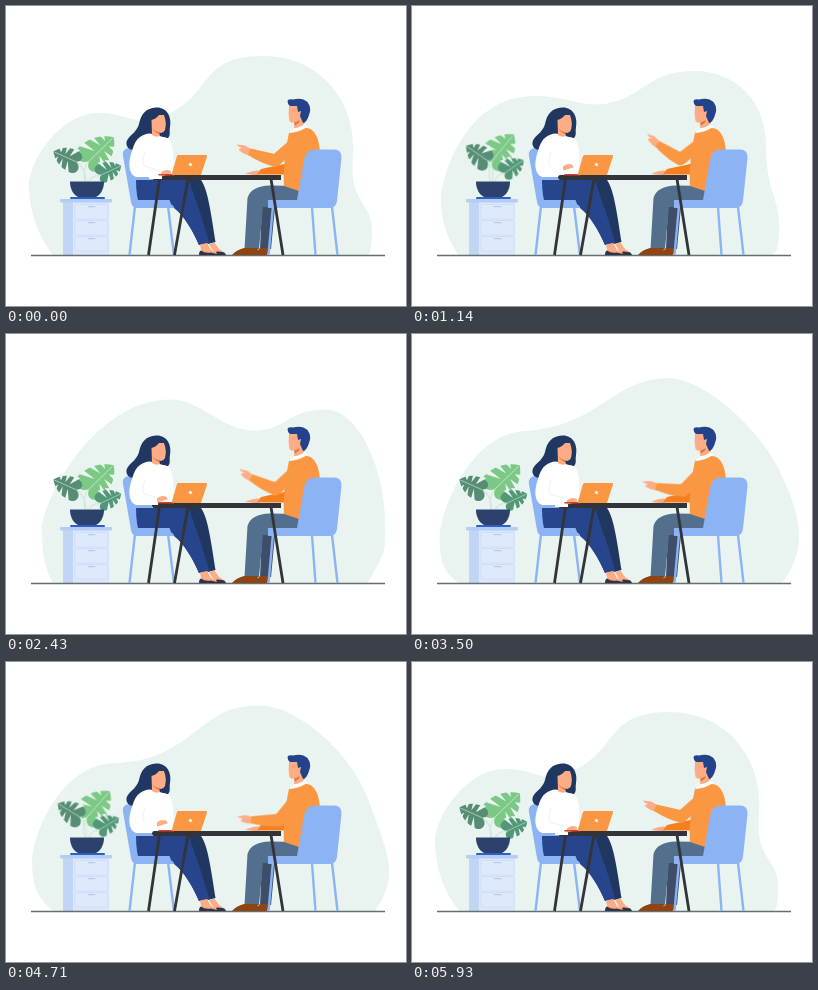
An HTML page without scripts that plays this animation: 400 px wide and 300 px high, repeating every 6070 ms.

```html
<!DOCTYPE html>
<html lang="en">
<head>
<meta charset="utf-8">
<title>Meeting at a table</title>
<style>
  html, body { margin: 0; width: 100%; height: 100%; overflow: hidden; background: #fff; }
  body > svg { display: block; width: 100%; height: 100%; }

  .blob, .leaf, .upper-arm, .forearm, .typing {
    animation: 6070ms ease-in-out infinite;
  }
  .blob { animation-name: morph; fill: #e9f4f0; }
  .leaf { animation-name: sway; transform-origin: 81px 178px; }
  .upper-arm { animation-name: swing; transform-origin: 293px 134px; }
  .forearm { animation-name: gesture; transform-origin: 270px 155px; }
  .typing { animation-name: type; }

  @keyframes morph {
    0%, 4.78%, 97.69%, 100% {
      d: path("M48 250C33 232 23 206 23 180S55 107 92 107C129 107 130 126 168 105S196 50 257 50S351 100 347 150S366 195 366 224S362 247 356 256Z");
    }
    4.78% { animation-timing-function: cubic-bezier(.4, 0, .8, .7); }
    18.78% {
      d: path("M47 250C36 234 29 216 29 194S52 90 122 90C160 90 175 105 205 95S240 65 282 65S354 95 354 140S367 190 367 220S363 244 356 256Z");
      animation-timing-function: cubic-bezier(.2, .3, .6, 1);
    }
    36.5% {
      d: path("M48 250C40 238 36 222 36 195S88 65 165 65C196 65 218 97 249 97S284 76 320 76S378 140 379 180S378 218 372 230S362 248 357 256Z");
      animation-timing-function: cubic-bezier(.65, 0, .35, 1);
    }
    65% {
      d: path("M48 250C34 240 27 234 27 206S55 104 107 100C130 98 150 90 172 76S216 41.5 251 41.5S344 90 366 132S388 192 388 206S378 244 364 256Z");
      animation-timing-function: cubic-bezier(.65, 0, .35, 1);
    }
  }
  @keyframes sway {
    0%, 4.78%, 40.03%, 57.66%, 97.69%, 100% { transform: none; }
    18.78%, 68.2% { transform: rotate(var(--swing)); }
    85.83% { transform: rotate(calc(var(--swing) * .4)); }
  }
  @keyframes swing {
    0%, 4.78%, 97.69%, 100% { transform: none; }
    18.78% { transform: rotate(3deg); }
    57.66%, 85.83% { transform: rotate(-5deg); }
    68.2% { transform: rotate(-14deg); }
  }
  @keyframes gesture {
    0%, 4.78%, 97.69%, 100% { transform: none; }
    18.78% { transform: rotate(12deg); }
    40.03% { transform: rotate(8deg); animation-timing-function: ease-in; }
    57.66% { transform: rotate(-5deg); animation-timing-function: ease-out; }
    68.2% { transform: rotate(-14deg); }
    85.83% { transform: rotate(-5deg); }
  }
  @keyframes type {
    0%, 4.78%, 57.66%, 97.69%, 100% { transform: translate(4px, 6px); }
    18.78%, 68.2%, 85.83% { transform: none; }
    40.03% { transform: translate(0, 4px); }
  }

  .line { fill: none; stroke-linecap: round; stroke-linejoin: round; }
  .stem { fill: none; stroke: #cfe6d8; stroke-width: 1.1; }
  .chair { fill: #8cb4f5; }
  .chair-legs { fill: none; stroke: #8cb4f5; stroke-width: 2.4; }
  .skin { fill: #fdac85; }
  .shade { fill: #d9783f; }
  .navy { fill: #203761; }
  .trousers { fill: #27458c; }
  .orange { fill: #fb9642; }
</style>
</head>
<body>
<svg viewBox="0 0 400 300">
  <defs>
    <g id="monstera">
      <path d="M4 0C-5-3-5-16 8-15.500C20-15 30-8 35 0C30 8 20 14 9 13C-3 13-4 3 4 0Z"/>
      <path d="M6-18L14-3L12-17ZM17-17L21-3L22-15ZM27-13L27-3L31-9ZM5 15L14 3L12 16ZM17 15L20 3L22 14ZM26 13L26 3L31 8Z" fill="#e9f4f0"/>
      <path d="M4 0H33" class="line" stroke="#d5ebd9" stroke-width=".7"/>
    </g>
    <g id="drawer">
      <rect x="69" width="33" height="14.5" rx="1" fill="#dfe9fc" stroke="#c8dbf8" stroke-width=".7"/>
      <path d="M82 2.2H89" class="line" stroke="#a9c4ee" stroke-width="1"/>
    </g>
  </defs>

  <svg width="400" height="250">
    <path class="blob" d="M48 250C33 232 23 206 23 180S55 107 92 107C129 107 130 126 168 105S196 50 257 50S351 100 347 150S366 195 366 224S362 247 356 256Z"/>
  </svg>

  <g id="cabinet">
    <path d="M57 196H103V249H57Z" fill="#dbe7fb"/>
    <path d="M57 196H67V249H57Z" fill="#c1d6f5"/>
    <use href="#drawer" y="198.5"/>
    <use href="#drawer" y="214.5"/>
    <use href="#drawer" y="230.5"/>
    <rect x="54" y="193" width="52" height="3.6" rx="1" fill="#b5cdf2"/>
  </g>

  <g id="plant">
    <g class="leaf" style="--swing:-7deg">
      <path class="stem" d="M80 178Q76 168 81 157"/>
      <use href="#monstera" fill="#7cc986" transform="translate(80 158) rotate(-44) scale(1.1)"/>
    </g>
    <g class="leaf" style="--swing:11deg">
      <path class="stem" d="M80 178Q80 162 70 155"/>
      <use href="#monstera" fill="#568d74" transform="translate(73 157) rotate(204) scale(.8)"/>
    </g>
    <g class="leaf" style="--swing:-10deg">
      <path class="stem" d="M82 178Q86 168 95 170"/>
      <use href="#monstera" fill="#529878" transform="translate(93 170) rotate(-25) scale(.7)"/>
    </g>
    <rect x="64" y="191" width="35" height="2" rx="1" fill="#2e5fc4"/>
    <path d="M64 175.5H98C98 184 94 189 90 191H72C68 189 64 184 64 175.5Z" fill="#2c416c"/>
  </g>

  <path d="M25 249.6H379" stroke="#666e72" stroke-width="1.5"/>

  <g id="woman">
    <path class="chair-legs" d="M129 200L123.500 249M162 200L168 249"/>
    <path class="chair" d="M117 150Q116 142 124 142H146V194H174V202H132Q126 202 125 196Z"/>
    <path class="navy" d="M150 101.500C161 101 166 111 164 121C163 127 165 128 162 132H139C135 144 124 147 121 140C118 131 130 129 133 118C135 108 140 102 150 101.500Z"/>
    <path d="M134 131Q141 126 147 128L157 131Q166 131 167 146L168 171H130C122 168 122 156 126 145Q129 134 134 131Z" fill="#fff"/>
    <path class="skin" d="M145.500 114Q150 113 153 109L158 109Q161 117 159 124Q157 128 153 126.500L154 130Q150 132 146 129Z"/>
    <path class="shade" d="M147 122.500Q149 125.500 153 126.500L153.500 128Q148 126 147 122.500Z"/>
    <path d="M139 146Q135 154 138 160L151 164" class="line" stroke="#e3eaf3" stroke-width=".7"/>
    <path class="navy" d="M170 174H195C202 184 205 207 209.500 236L202 238Z"/>
    <path class="trousers" d="M130 174H182C187 190 196 210 203 237L193 239C187 225 179 211 168 202H134Q130 190 130 174Z"/>
    <path class="chair" d="M126 194H168V202H130Q126 200 126 194Z"/>
    <path class="trousers" d="M156 174H183C188 190 197 213 203 237L193 239C187 225 178 209 165 198Z"/>
    <path class="skin" d="M194 238.500L201 237L205 244L214 248H196ZM203 238L208.500 236.500L213 243L219 247L209 248Z"/>
    <path d="M193 249Q193 245 195 244.500Q199 247.500 205 246.500L211 248Q209 245 212 245.500L216 246Q219 246 220 249Z" fill="#303446"/>
  </g>

  <g id="man">
    <path d="M256 199L254 243H265L269 201L286 196Z" fill="#3e4d68"/>
    <path d="M293 180L264 179.500Q245 180 241.500 192L238.500 243H253L257 201H293Z" fill="#536f8e"/>
    <path d="M226 249Q230 244 238 242H252L251 249ZM248 249Q252 244 254 242H264L261 249Z" fill="#8f4512"/>
    <path class="skin" d="M254 164.500Q246 164 239 168L252 169.500Z"/>
    <path d="M283 157L255 163L251 168.500H283Z" fill="#f57f1e"/>
    <path class="orange" d="M283 127C290 121 302 120 307 125C312 130 314 140 314 148L300 160L293 185L278 180C277 165 279 145 283 127Z"/>
    <path d="M284 125Q291 122 298 117L301 121Q294 126 284 127Z" fill="#fff"/>
    <path class="skin" d="M283 99Q282 108 283.500 115Q285 117.500 288.500 116.500L288 122Q295 122 299 117V100Z"/>
    <path class="shade" d="M288.500 116.500Q292 115.500 294 113.500Q293 118 288.300 119.500Z"/>
    <path d="M281.500 95Q282 92.500 287 93.500Q296 91 301.500 96Q306 102 303 109Q301 116 297 117L294 110L295 105L292 106L291 100H284Q281.500 98.500 281.500 95Z" fill="#24418c"/>
  </g>

  <g id="man-chair">
    <path class="chair-legs" d="M267 200L262.500 249M306 201L309.500 249M326 201L331.500 249"/>
    <path class="chair" d="M308 143.500H328Q336 143.500 335.500 152L331 195Q330 202 324 202H262V194H291L298 154Q300 143.500 308 143.500Z"/>
  </g>

  <g class="upper-arm">
    <path d="M293 134L270 154" class="line" stroke="#fb9642" stroke-width="12"/>
    <g class="forearm">
      <path class="skin" d="M245 143L239 139.500L231 138.500Q231 140 236 142Q231 143 234 145Q238 148.500 243 149.500Z"/>
      <path class="orange" d="M244.500 142.500L271 148.500Q279 156 270 161Q256 158 242 149Z"/>
    </g>
  </g>

  <g id="table">
    <path d="M153.500 173L142.500 249M182 173L168.500 249M265 173L277 249" fill="none" stroke="#33343a" stroke-width="2.8"/>
    <path d="M148 169H275V174H148Q146 174 146 171.500Q146 169 148 169Z" fill="#33343a"/>
  </g>

  <g class="typing">
    <path d="M139 157L152 160V167H139Z" fill="#fff"/>
    <path class="skin" d="M151 160.500Q155 157 160 158.500L162 161.500Q159 161 157 163L151 164.500Z"/>
  </g>
  <path d="M153 168.800H168" class="line" stroke="#d5402f" stroke-width="1.6"/>
  <path class="orange" d="M173 149H200Q201.500 149 201 150.500L195 169H165.500L171 150Q171.500 149 173 149Z"/>
  <circle cx="184.500" cy="158.500" r="1.600" fill="#fff"/>
</svg>
</body>
</html>
```
